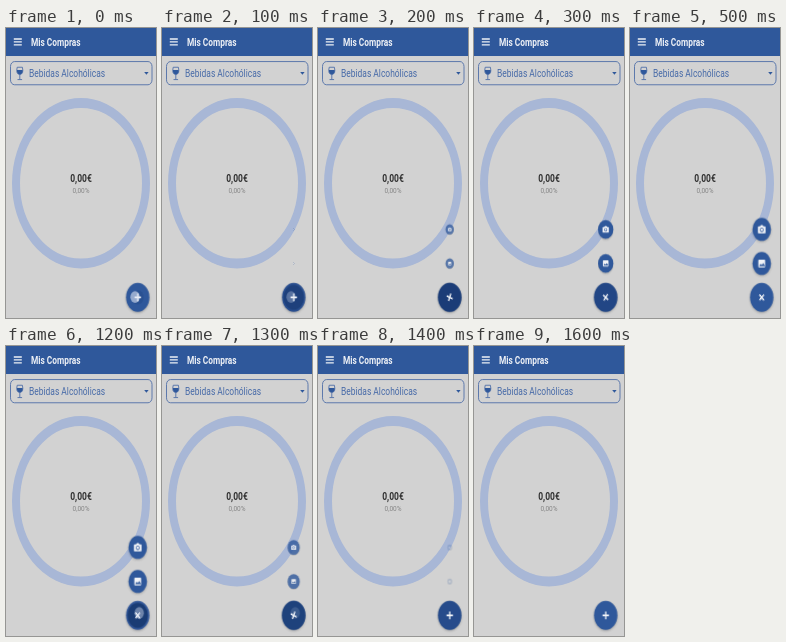
Write an HTML page that moves like this. It is 150 by 290 pixels and loops after 2 s.

```html
<!DOCTYPE html>
<html lang="es">
<head>
<meta charset="utf-8">
<title>Mis Compras</title>
<style>
  html, body { margin: 0; width: 100%; height: 100%; overflow: hidden; background: #d2d2d2; }
  svg { display: block; width: 150px; height: 290px; font-family: Roboto, "Liberation Sans", sans-serif; }
  .blue { fill: #2f589b; }
  .line { fill: none; stroke: #4f6fa8; }

  /* the picture advances in 100 ms steps: 5% each */
  .mini, .icon, .face, .ripple, .touch { animation: 2s step-end infinite; }
  .mini { animation-name: mini; }
  .icon { animation-name: icon; }
  .face { animation-name: face; }
  .ripple { animation-name: ripple; }
  .touch { animation-name: touch; }

  @keyframes mini {
    0%  { transform: scale(0); opacity: 0; }
    5%  { transform: scale(.1); opacity: .2; }
    10% { transform: scale(.45); opacity: .75; }
    15% { transform: scale(.82); opacity: 1; }
    20% { transform: scale(.97); opacity: 1; }
    25%, 60% { transform: none; opacity: 1; }
    65% { transform: scale(.65); opacity: .8; }
    70% { transform: scale(.25); opacity: .2; }
    75%, 100% { transform: scale(0); opacity: 0; }
  }
  @keyframes icon {
    0%, 5% { transform: none; }
    10% { transform: rotate(22deg); }
    15% { transform: rotate(38deg); }
    20%, 60% { transform: rotate(45deg); }
    65% { transform: rotate(24deg); }
    70%, 100% { transform: none; }
  }
  @keyframes face {
    0%  { fill: #2f589b; }
    5%  { fill: #284d8e; }
    10% { fill: #1f417f; }
    15% { fill: #264b8c; }
    20% { fill: #2c5396; }
    25% { fill: #2f589b; }
    50% { fill: #3c639f; }
    55% { fill: #365d9c; }
    60% { fill: #34599a; }
    65% { fill: #29508f; }
    70% { fill: #2b5294; }
    75%, 100% { fill: #2f589b; }
  }
  @keyframes ripple {
    0%  { transform: scale(.5); opacity: .2; }
    5%  { transform: scale(.85); opacity: .6; }
    10% { transform: none; opacity: .5; }
    15% { transform: none; opacity: .25; }
    20% { transform: none; opacity: 0; }
    50% { transform: scale(.5); opacity: .15; }
    55% { transform: scale(.7); opacity: .5; }
    60% { transform: scale(.87); opacity: .9; }
    65% { transform: none; opacity: .6; }
    70% { transform: none; opacity: .25; }
    75%, 100% { transform: none; opacity: 0; }
  }
  @keyframes touch {
    0%  { transform: translate(-2.6px, -.3px); opacity: .6; }
    5%  { transform: translate(-2.6px, -.3px); opacity: .3; }
    10% { transform: translate(-2.6px, -.3px); opacity: 0; }
    50% { transform: translate(1.6px, -2.6px); opacity: .62; }
    55% { transform: translate(1.6px, -2.4px); opacity: .6; }
    60% { transform: translate(1.5px, -2px); opacity: .42; }
    65% { transform: translate(1.5px, -2px); opacity: .15; }
    70%, 100% { transform: translate(1.5px, -2px); opacity: 0; }
  }
</style>
</head>
<body>
<svg viewBox="0 0 150 235" preserveAspectRatio="none">
  <defs>
    <filter id="soft" x="-30%" y="-30%" width="160%" height="160%"><feGaussianBlur stdDeviation=".9"/></filter>
  </defs>
  <rect width="150" height="235" fill="#d2d2d2"/>

  <!-- header -->
  <rect class="blue" width="150" height="22.7"/>
  <path d="M7.8 8.9h8M7.8 11.3h8M7.8 13.7h8" stroke="#eef1f6" stroke-width="1.1"/>
  <text x="25" y="14.6" font-size="8.35" font-weight="700" fill="#eef1f6">Mis Compras</text>

  <!-- category selector -->
  <rect class="line" x="4.5" y="27.2" width="141.5" height="18.8" rx="4" stroke-width=".8" stroke="#6480b2"/>
  <path class="line" d="M11.2 31.8h5.2q1.6 5.6-2.6 5.9-4.2-.3-2.6-5.9zM13.8 37.7v4M11.5 41.8h4.6" stroke-width=".8"/>
  <path class="blue" d="M10.9 34h5.8q.1 3.5-2.9 3.6-3-.1-2.9-3.6z"/>
  <text x="23" y="39.9" font-size="8.45" fill="#486ba8">Bebidas Alcohólicas</text>
  <path class="blue" d="M138.2 35.6h4.4l-2.2 2.2z"/>

  <!-- spending ring -->
  <circle cx="75" cy="125.8" r="65" fill="none" stroke="#a8b7d6" stroke-width="8"/>
  <g text-anchor="middle">
    <text x="75" y="124.9" font-size="8.5" font-weight="700" fill="#303030">0,00€</text>
    <text x="75" y="134" font-size="6.5" fill="#858585">0,00%</text>
  </g>

  <!-- camera action -->
  <g transform="translate(131.7 163.2)"><g class="mini">
    <circle cy=".8" r="9.3" fill="#555" opacity=".35" filter="url(#soft)"/>
    <circle class="blue" r="9.3"/>
    <path d="M-3.2-2.4h1.5l.8-1h1.8l.8 1h1.5q.6 0 .6.6v4.3q0 .6-.6.6h-6.4q-.6 0-.6-.6v-4.3q0-.6.6-.6z" fill="#f2f4f8"/>
    <circle class="blue" cy=".3" r="1.8"/>
    <circle cy=".3" r="1.1" fill="#f2f4f8"/>
  </g></g>

  <!-- gallery action -->
  <g transform="translate(131.7 190.8)"><g class="mini">
    <circle cy=".8" r="9.3" fill="#555" opacity=".35" filter="url(#soft)"/>
    <circle class="blue" r="9.3"/>
    <rect x="-3.4" y="-3.1" width="6.8" height="6.2" rx=".7" fill="#f2f4f8"/>
    <path class="blue" d="M-2.6 2.1l1.5-2 1.1 1.3 1.4-1.9 1.9 2.6z"/>
  </g></g>

  <!-- main button -->
  <g transform="translate(131.7 218.3)">
    <circle cy=".9" r="11.6" fill="#555" opacity=".4" filter="url(#soft)"/>
    <circle class="face" r="11.7"/>
    <circle class="ripple" r="11.7" fill="#183970"/>
    <path class="icon" d="M-3.2 0h6.4M0-3.2v6.4" stroke="#f2f4f8" stroke-width="1.3"/>
    <circle class="touch" r="4.7" fill="#dfe7f5"/>
  </g>
</svg>
</body>
</html>
```
